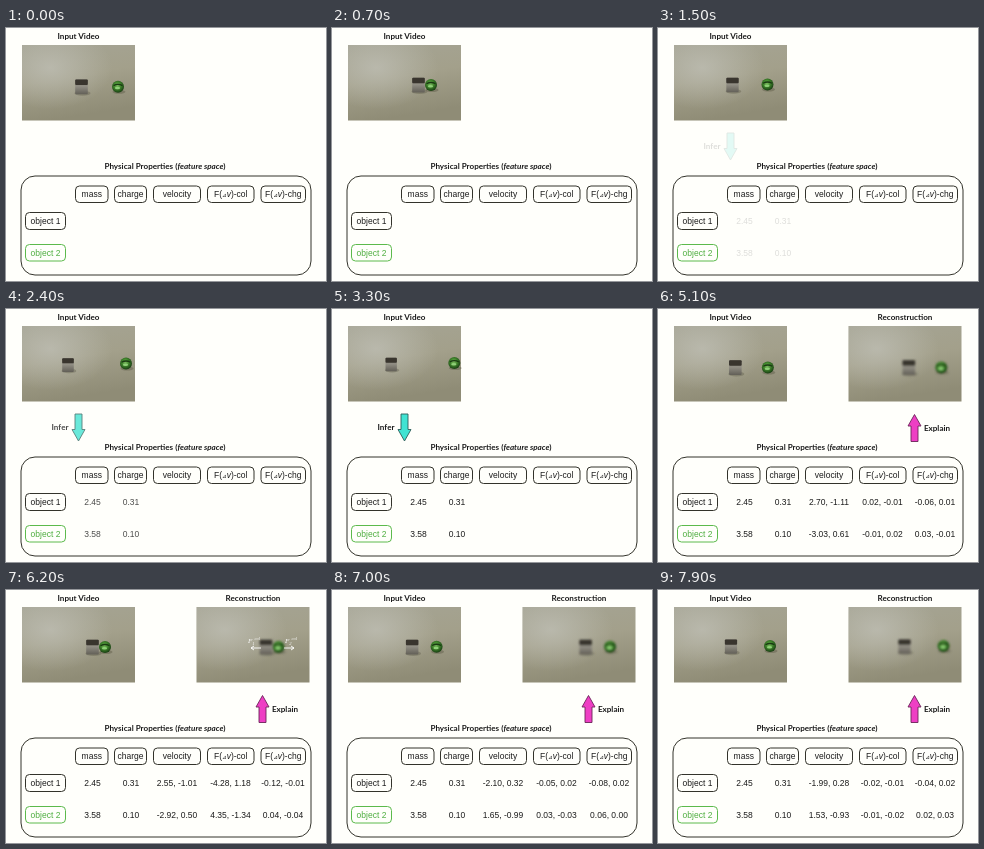
An HTML page that plays this animation: 320 by 253 pixels, repeating every 8000 ms.

```html
<!DOCTYPE html>
<html lang="en">
<head>
<meta charset="utf-8">
<title>Physical properties</title>
<style>
html, body { margin: 0; width: 320px; height: 253px; overflow: hidden; background: #fffffb; }
svg { display: block; }
text { font: 8.5px "Liberation Sans", Arial, sans-serif; fill: #1c1c1c; text-anchor: middle; }
.title { font: 700 8.1px Lato, sans-serif; }
.force { font: italic 7px "Liberation Serif", serif; fill: #fff; }
.box { fill: none; stroke: #33332b; stroke-width: 1; }
.green { stroke: #5cba4c; }
text.green { fill: #4fae40; stroke: none; }
</style>
</head>
<body>
<svg id="stage" width="320" height="253" viewBox="0 0 320 253">
  <defs>
    <linearGradient id="floor" x1="0" y1="0" x2="0.25" y2="1">
      <stop offset="0" stop-color="#a5a494"/>
      <stop offset="0.5" stop-color="#a3a08b"/>
      <stop offset="1" stop-color="#8f8c76"/>
    </linearGradient>
    <radialGradient id="light" cx="0.25" cy="0.3" r="0.55">
      <stop offset="0" stop-color="#c0c0b6" stop-opacity="0.75"/>
      <stop offset="1" stop-color="#c0c0b6" stop-opacity="0"/>
    </radialGradient>
    <linearGradient id="face" x1="0" y1="0" x2="0" y2="1">
      <stop offset="0" stop-color="#77736a"/>
      <stop offset="0.45" stop-color="#918e84"/>
      <stop offset="1" stop-color="#625f57"/>
    </linearGradient>
    <radialGradient id="ball" cx="0.45" cy="0.4" r="0.6">
      <stop offset="0" stop-color="#78b55c"/>
      <stop offset="0.45" stop-color="#438a2e"/>
      <stop offset="1" stop-color="#183d12"/>
    </radialGradient>
    <filter id="soft" x="-50%" y="-50%" width="200%" height="200%">
      <feGaussianBlur stdDeviation="0.8"/>
    </filter>
  </defs>
</svg>
<script>
const LOOP = 8000, STEP = 100;
const stage = document.getElementById("stage");

function add(parent, tag, attrs = {}, text) {
  const el = document.createElementNS("http://www.w3.org/2000/svg", tag);
  for (const key in attrs) el.setAttribute(key, attrs[key]);
  if (text !== undefined) el.textContent = text;
  parent.append(el);
  return el;
}
const group = (parent = stage) => add(parent, "g");
const label = (parent, x, y, text, cls = "") => add(parent, "text", { x, y, class: cls }, text);
const box = (x, y, width, height, rx, cls = "") =>
  add(stage, "rect", { x, y, width, height, rx, class: "box " + cls });
const show = (el, alpha) => el.setAttribute("opacity", alpha);
const ramp = (t, from, to) => Math.min(1, Math.max(0, (t - from) / (to - from)));

// Linear interpolation over rows of [time, ...values].
function sample(rows, t) {
  if (t <= rows[0][0]) return rows[0].slice(1);
  const i = rows.findIndex(row => row[0] > t);
  if (i < 0) return rows[rows.length - 1].slice(1);
  const a = rows[i - 1], b = rows[i], k = ramp(t, a[0], b[0]);
  return a.slice(1).map((v, j) => v + (b[j + 1] - v) * k);
}

// Scene time (0 = collision), cube x, y, ball x, y, cube scale.
const PATH = [
  [-900, 72, 59.5, 116, 59.5, 1],
  [-700, 75.5, 58.8, 112, 58.8, 1],
  [0, 86.5, 57, 99, 57, 1],
  [800, 74.5, 57, 109.5, 56.5, 0.98],
  [900, 73, 56.5, 112, 56, 0.97],
  [1700, 62, 56, 120, 54.5, 0.92],
  [2300, 59.5, 55.5, 122, 54.2, 0.9],
  [2800, 59, 55.3, 122.5, 54, 0.9]
];

// Time, then velocity, col and chg pairs for both objects.
const READINGS = [
  [5000, 2.71, -1.12, 0.02, -0.01, -0.05, 0.01, -3.04, 0.62, -0.01, 0.02, 0.03, -0.01],
  [6000, 2.60, -1.04, 0.04, -0.02, -0.10, 0.01, -2.95, 0.53, -0.03, 0.01, 0.05, -0.03],
  [6200, 2.55, -1.01, -4.28, 1.18, -0.12, -0.01, -2.92, 0.50, 4.35, -1.34, 0.04, -0.04],
  [6500, -2.16, 0.34, -0.06, 0.03, -0.11, 0.02, 1.72, -1.02, 0.05, -0.04, 0.08, -0.02],
  [7900, -1.99, 0.28, -0.02, -0.01, -0.04, 0.02, 1.53, -0.93, -0.01, -0.02, 0.02, 0.03]
];

function makeVideo(x, title, blurred) {
  const root = group();
  label(root, x + 56.5, 10.7, title, "title");
  for (const fill of ["url(#floor)", "url(#light)"])
    add(root, "rect", { x, y: 17, width: 113, height: 75.5, fill });
  const items = group(root);
  if (blurred) items.setAttribute("filter", "url(#soft)");
  const cube = group(items), ball = group(items);
  add(cube, "ellipse", { cx: 1, cy: 6.5, rx: 8, ry: 2.5, fill: "#5f5c4c", opacity: 0.4 });
  add(cube, "rect", { x: -6.3, y: -7.3, width: 12.6, height: 14.8, rx: 1, fill: "url(#face)" });
  add(cube, "rect", { x: -6.3, y: -7.3, width: 12.6, height: 5.5, rx: 1, fill: "#39352e" });
  add(ball, "ellipse", { cx: 1, cy: 5, rx: 6.5, ry: 2, fill: "#55523f", opacity: 0.4 });
  add(ball, "circle", { r: 6, fill: "url(#ball)" });
  add(ball, "path", { d: "M-4.5-1.2Q0-3.8 4.5-1.2", fill: "none", stroke: "#193a12", "stroke-width": 1.3 });
  add(ball, "ellipse", { cx: -0.5, cy: 1.2, rx: 2.6, ry: 1.3, fill: "#8fd078" });
  const place = (el, px, py, s) =>
    el.setAttribute("transform", `translate(${px} ${py}) scale(${s})`);
  return {
    root,
    draw(s) {
      const [cx, cy, bx, by, size] = sample(PATH, s);
      const dx = blurred ? 173.5 : 0;
      place(cube, cx + dx, cy, size);
      place(ball, bx + dx, by, 1);
    }
  };
}

const input = makeVideo(16, "Input Video", false);
const recon = makeVideo(190.5, "Reconstruction", true);

const forces = group(recon.root);
function makeForce(x, dir, sub) {
  const tip = x + dir * 10;
  add(forces, "path", {
    d: `M${x} 58H${tip}m${-dir * 3}-2l${dir * 3} 2l${-dir * 3} 2`,
    fill: "none", stroke: "#fff", "stroke-width": 0.9
  });
  const text = label(forces, tip - dir * 3, 53, "F", "force");
  const small = { style: "font-size:4.5px" };
  add(text, "tspan", { ...small, dy: 1.8 }, sub);
  add(text, "tspan", { ...small, dy: -5 }, "col");
}
makeForce(255, -1, "1");
makeForce(278, 1, "2");

const infer = group();
label(infer, 54, 121, "Infer", "title");
add(infer, "path", {
  d: "M69 105H76V120.5H79L72.5 132L66 120.5H69Z",
  fill: "#40e3d2", stroke: "#2c5d58", "stroke-width": 0.9
});

const explain = group();
label(explain, 279, 121.8, "Explain", "title");
add(explain, "path", {
  d: "M253 132.5H260V117H263L256.5 105.5L250 117H253Z",
  fill: "#ee3fc4", stroke: "#6b2559", "stroke-width": 0.9
});

const heading = label(stage, 159, 140.5, "Physical Properties (", "title");
add(heading, "tspan", { "font-style": "italic", style: "font-style:italic" }, "feature space");
add(heading, "tspan", {}, ")");

box(15, 148, 290, 99, 14);
const columns = [
  [69.5, 32.5, "mass"], [108.5, 32, "charge"], [147.5, 47, "velocity"],
  [201.5, 46.5, "col"], [255, 44.5, "chg"]
];
columns.forEach(([x, width, name], i) => {
  box(x, 158, width, 16.5, 4);
  const mid = x + width / 2;
  if (i < 3) return label(stage, mid, 169, name);
  const text = label(stage, mid, 169, "F(");
  add(text, "tspan", { style: "font: 5.5px 'DejaVu Sans', sans-serif" }, "⊿");
  add(text, "tspan", { style: "font-style:italic" }, "v");
  add(text, "tspan", {}, ")-" + name);
});
box(19.5, 184.5, 40, 17, 4);
label(stage, 39.5, 195.8, "object 1");
box(19.5, 216.5, 40, 16.5, 4, "green");
label(stage, 39.5, 228, "object 2", "green");

const ROWS = [196, 228];
const constants = group(), readings = group();
[["2.45", "0.31"], ["3.58", "0.10"]].forEach(([mass, charge], i) => {
  label(constants, 86.5, ROWS[i], mass);
  label(constants, 125, ROWS[i], charge);
});
const cells = ROWS.flatMap(y => [171, 224.5, 277].map(x => label(readings, x, y, "")));

const decimals = v => (Math.abs(v) < 0.005 ? 0 : v).toFixed(2);

function draw(t) {
  const first = t < 4200;
  const scene = first ? t - 700 : (t - 6200) * 0.53;
  const fade = ramp(t, 4500, 5100);
  input.draw(scene);
  recon.draw(scene);
  show(input.root, first ? 1 : fade);
  show(recon.root, first ? 0 : fade);
  show(readings, first ? 0 : fade);
  show(explain, first ? 0 : 1);
  const found = ramp(t, 1300, 2700);
  show(infer, first ? found : 0);
  show(constants, first ? found : 1);
  show(forces, ramp(t, 6000, 6200) * (1 - ramp(t, 6300, 6500)));
  const values = sample(READINGS, t);
  cells.forEach((cell, i) => {
    cell.textContent = decimals(values[2 * i]) + ", " + decimals(values[2 * i + 1]);
  });
}

const start = performance.now();
function tick() {
  const t = (performance.now() - start) % LOOP;
  draw(Math.floor(t / STEP) * STEP);
  requestAnimationFrame(tick);
}
tick();
</script>
</body>
</html>
```
